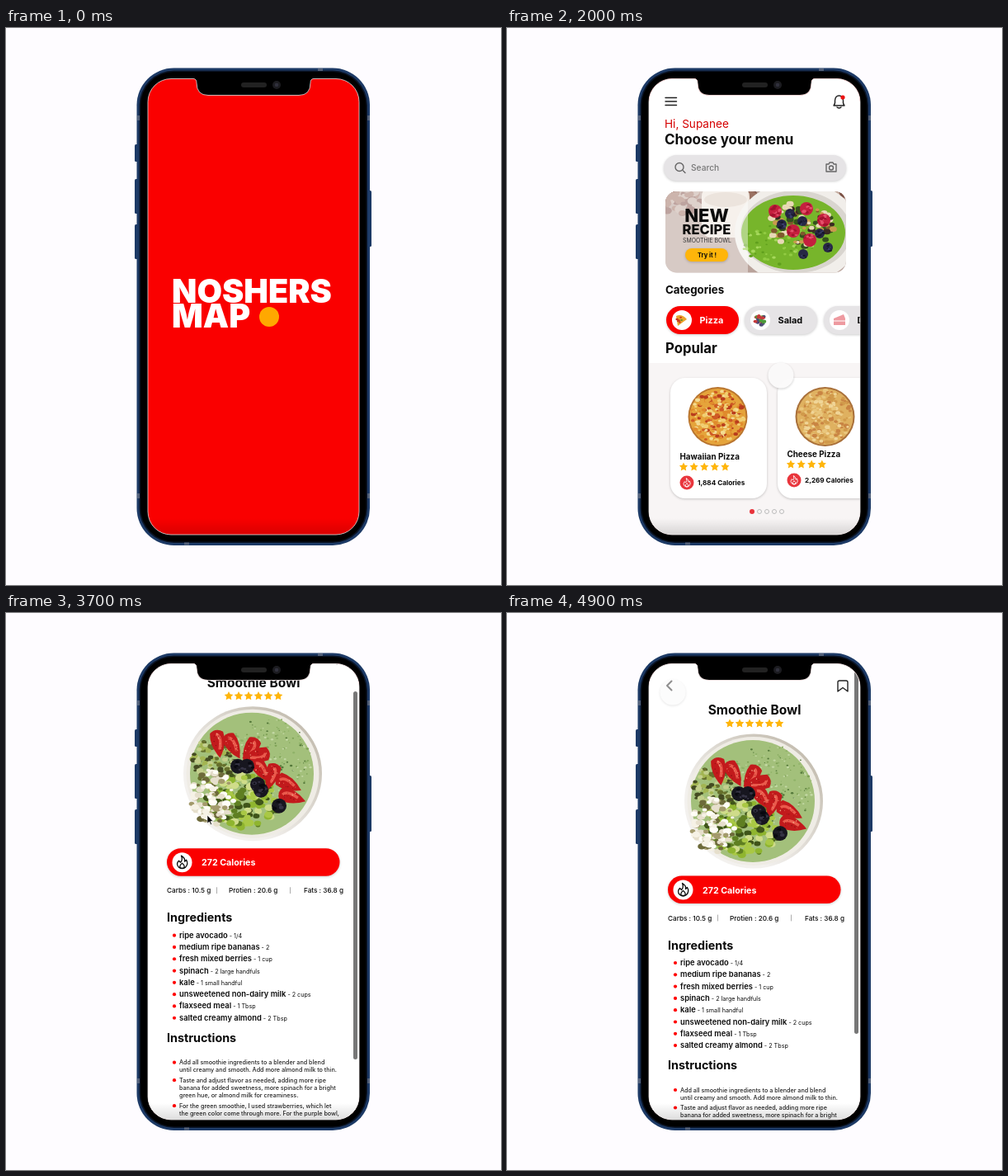
Animation of 600 by 675 pixels, one loop 5000 ms. Source, as an HTML page:

```html
<!DOCTYPE html>
<html lang="en">
<head>
<meta charset="utf-8">
<title>Recipe app</title>
<style>
html, body { margin: 0; width: 100%; height: 100%; overflow: hidden; background: #fefcff; }
svg { display: block; width: 100%; height: 100%; font-family: Inter, "Open Sans", sans-serif; }
.lift { filter: drop-shadow(0 1.5px 1.5px #0003); }
.line { fill: none; stroke: #222; stroke-width: 1.4; stroke-linecap: round; stroke-linejoin: round; }
</style>
</head>
<body>
<script>
const RED = '#fa0000', INK = '#0b0b0b', GOLD = '#ffb50a';
const SCREEN = 'M200 61.5H227q4 0 4 5q0 15 14 15H355q14 0 14-15q0-5 4-5H400a28 28 0 0 1 28 28V586a28 28 0 0 1-28 28H200a28 28 0 0 1-28-28V89.5a28 28 0 0 1 28-28Z';

let seed = 7;
const rnd = () => (seed = seed * 16807 % 2147483647) / 2147483647;

const text = (x, y, size, weight, str, fill = INK, anchor = 'start') =>
  `<text x="${x}" y="${y}" font-size="${size}" font-weight="${weight}" fill="${fill}" text-anchor="${anchor}">${str}</text>`;
const rect = (x, y, w, h, r, fill, more = '') =>
  `<rect x="${x}" y="${y}" width="${w}" height="${h}" rx="${r}" fill="${fill}" ${more}/>`;
const oval = (x, y, rx, ry, fill, more = '') =>
  `<ellipse cx="${x}" cy="${y}" rx="${rx}" ry="${ry}" fill="${fill}" ${more}/>`;
const disc = (x, y, r, fill, more) => oval(x, y, r, r, fill, more);
const line = (d, more = '') => `<path class="line" d="${d}" ${more}/>`;
const lift = 'class="lift"';

// Random specks spread over an ellipse
const specks = (n, x, y, rx, ry, size, colors) => Array.from({ length: n }, () => {
  const a = rnd() * 6.283, d = Math.sqrt(rnd()), s = size * (.5 + rnd() * .7);
  return oval((x + Math.cos(a) * d * rx).toFixed(1), (y + Math.sin(a) * d * ry).toFixed(1),
    s.toFixed(1), (s * .75).toFixed(1), colors[rnd() * colors.length | 0]);
}).join('');

const stars = (n, x, y, step, r) => Array.from({ length: n }, (_, i) => {
  const pts = Array.from({ length: 10 }, (_, k) => {
    const a = k * Math.PI / 5, d = k % 2 ? r * .5 : r;
    return (x + i * step + Math.sin(a) * d).toFixed(1) + ',' + (y - Math.cos(a) * d).toFixed(1);
  });
  return `<polygon points="${pts.join(' ')}" fill="${GOLD}"/>`;
}).join('');

const flame = (x, y, k, color) =>
  `<path transform="translate(${x} ${y}) scale(${k})" fill="none" stroke="${color}" stroke-width="1.3" stroke-linejoin="round"
    d="M-1-8Q4-5 3-1L5-3Q8 2 4 6Q0 9-4 6Q-8 2-4-2L-2 0Q1-3-1-8ZM0 1Q-4 4-2 7H2Q4 4 0 1Z"/>`;

const berry = (x, y, r, colors) => disc(x, y, r, colors[0]) + specks(12, x, y, r * .8, r * .8, r * .28, colors);

const logo = (x, y, k) => `<g transform="translate(${x} ${y}) scale(${k})">` +
  text(-2, 25.5, 39.5, 900, 'NOSHERS', '#fff') + text(-2, 55.5, 39.5, 900, 'MAP', '#fff') +
  disc(116, 43, 12, '#ffa800') + '</g>';

const splash = rect(170, 60, 260, 556, 0, RED) + logo(203, 307, 1);

const login = rect(170, 250, 260, 366, 0, '#e9e9e9') + rect(170, 60, 260, 152, 0, RED) + logo(230, 135, .72) +
  rect(170, 211, 260, 39, 0, '#fff', lift) +
  text(216, 236, 13.3, 700, 'Log in', '#e00000') + text(344, 236, 13.2, 400, 'Sign Up', '#444') +
  rect(206, 247, 54, 3.5, 0, RED) +
  rect(200, 274, 200, 38, 19, '#fff', lift) + text(212, 296, 9.3, 400, 'Enter Email or Username', '#888') +
  rect(200, 324, 200, 38, 19, '#fff', lift) + text(212, 346.5, 9.5, 400, 'Password', '#888') +
  text(393, 381, 8.3, 500, 'forgot password?', '#777', 'end') +
  rect(247, 406, 106, 32, 16, RED, lift) + text(298, 428, 14, 500, 'Log in', '#fff', 'middle') +
  line('M203 497H281M314 497H396', 'style="stroke:#888;stroke-width:1"') +
  text(298, 502, 13, 400, 'OR', '#666', 'middle') +
  ['#2458c5', '#4285f4', '#000'].map((c, i) => disc(250 + i * 44.5, 564, 16, '#fff') + disc(250 + i * 44.5, 564, 9, c)).join('');

const chip = (x, label, fill, color, icon) => rect(x, 337, 88, 34, 17, fill, lift) +
  disc(x + 19, 354, 12, '#fff') + `<g transform="translate(${x + 19} 354)">${icon}</g>` +
  text(x + 40.5, 358, 10.9, 700, label, color);

const card = (x, y, name, count, calories, crust, toppings) => rect(x, 424, 117, 146, 18, '#fff', lift) +
  disc(x + 57.5, 471, 36, crust) + disc(x + 57.5, 471, 34, toppings[0]) +
  specks(260, x + 57.5, 471, 32, 32, 2.7, toppings) +
  text(x + 11.5, y, 9.8, 700, name) + stars(count, x + 16, y + 9, 12.6, 5.4) +
  disc(x + 20, y + 28, 8.5, '#e9363d') + flame(x + 20, y + 28, .68, '#fff') +
  text(x + 33, y + 31, 8.2, 700, calories + ' Calories');

const banner = `<g clip-path="url(#banner)">` + rect(190, 196, 224, 102, 0, '#b9a39b') +
  specks(60, 205, 210, 30, 18, 6, ['#8d6159', '#a77d70', '#c6b0a5']) +
  specks(40, 345, 205, 75, 14, 6, ['#7b5146', '#9a7162', '#c5aca0']) +
  rect(236, 192, 58, 62, 12, '#efe6dd') + oval(265, 208, 26, 9, '#ded0c4') +
  oval(352, 248, 76, 62, '#f1eeea') + oval(350, 247, 67, 50, '#d9d5cf') + oval(347, 248, 63, 45, '#77b52b') +
  specks(70, 330, 262, 44, 26, 2.2, ['#5f9f1c', '#92cc43', '#a6d85c']) +
  specks(90, 358, 238, 42, 27, 4, ['#3b2a22', '#7f5a2d', '#c99a4e', '#35511d', '#e8d9b6']) +
  [[325, 222], [363, 219], [347, 246], [367, 257], [384, 233]].map(p => berry(...p, 8, ['#c51f3e', '#e4506b', '#a2122e'])).join('') +
  [[343, 225], [333, 238], [379, 249], [359, 274], [389, 266], [358, 234]].map(p => berry(...p, 6, ['#272745', '#3b3f6c', '#17172b'])).join('') +
  rect(190, 196, 102, 102, 0, '#fff', 'opacity=".42"') + '</g>' +
  text(242, 235, 22, 800, 'NEW', INK, 'middle') + text(242, 250, 16.5, 800, 'RECIPE', INK, 'middle') +
  text(242.5, 260, 6.9, 400, 'SMOOTHIE BOWL', '#333', 'middle') +
  rect(216, 267, 52, 16, 8, GOLD, lift) + text(242.5, 278, 7.4, 700, 'Try it !', INK, 'middle');

const home = rect(170, 60, 260, 556, 0, '#fff') + rect(170, 406, 260, 210, 0, '#f8f5f5') +
  line('M192 84.5H205.5M192 89H205.5M192 93.5H205.5') +
  line('M396 94Q398 92 397.5 88Q398 82 402.5 82Q407 82 407.5 88Q407 92 409 94ZM400 96Q402.5 98 405 96') +
  disc(407, 84, 2.6, '#e11') +
  text(191, 120.5, 13.6, 400, 'Hi, Supanee', '#d50000') + text(191, 141, 17, 700, 'Choose your menu') +
  rect(190, 154, 221, 31, 15.5, '#e6e4e6', lift) +
  `<g opacity=".65">${line('M213.5 173L216 175.5M214 168.5a5 5 0 1 1-10 0a5 5 0 1 1 10 0')}` +
  line('M387 165H390L391 163H395L396 165H399V174H387ZM395.5 169.5a2.5 2.5 0 1 1-5 0a2.5 2.5 0 1 1 5 0') + '</g>' +
  text(223, 173, 10.2, 500, 'Search', '#777') + banner +
  text(192, 322, 13.3, 700, 'Categories') +
  chip(193, 'Pizza', RED, '#fff', '<path d="M-7-5Q0-8 6-1L-5 7Z" fill="#eba52d"/>' + specks(6, -2, -1, 4, 4, 1.5, ['#c8321c', '#5b8a2a'])) +
  chip(288, 'Salad', '#e6e4e6', INK, specks(26, 0, 0, 7, 6, 2.4, ['#4c9a3a', '#83bd55', '#c63a3a', '#4b4a75'])) +
  chip(384, 'Dessert', '#e6e4e6', INK, '<path d="M-7-2L5-7L7-2V6H-7Z" fill="#ee9aa0"/><path d="M-7 1H7" stroke="#fff"/>') +
  text(192, 394, 16.7, 700, 'Popular') +
  card(198, 523, 'Hawaiian Pizza', 5, '1,884', '#b9752f', ['#e5a43b', '#f1cf72', '#cf5a25', '#e08a2c', '#b93d1d', '#f4dc93']) +
  card(328, 520, 'Cheese Pizza', 4, '2,269', '#a9703a', ['#dfb160', '#e9c67c', '#d19a4b', '#c98443', '#f0d597']) +
  disc(297, 586, 3, '#e8323a') + [306, 315, 324, 333].map(x => disc(x, 586, 2.5, 'none', 'stroke="#bbb"')).join('');

const strawberry = ([x, y, a]) => `<g transform="translate(${x} ${y}) rotate(${a})">` +
  '<path d="M-8-13Q0-19 8-13Q11 2 0 18Q-11 2-8-13Z" fill="#c21a1c"/><path d="M-1-11Q6-8 1 8" stroke="#ea5a4c" stroke-width="3.5" fill="none"/>' +
  specks(12, 0, -2, 6, 12, .8, ['#f0a080', '#8f0f12']) + '</g>';

const bowl = oval(299, 228, 84, 81.5, 'url(#rim)') + oval(299, 228, 80.5, 78, '#efece5') + oval(298, 228, 75, 74, '#a3c07b') +
  specks(260, 318, 212, 52, 54, 1.4, ['#7fa356', '#8fb268', '#c3d8a4', '#54783a']) +
  specks(120, 253, 215, 27, 33, 3.6, ['#66702c', '#a3b552', '#454c22', '#c3cf8c']) +
  specks(150, 287, 261, 44, 33, 5, ['#8fb52f', '#a9c845', '#5f7f22', '#cfdc8a', '#3f5419']) +
  specks(120, 250, 257, 26, 34, 4.5, ['#f6f2e6', '#e6dfcc', '#fffdf6', '#a39a6c', '#6d6a3a']) +
  [[257, 191, -8], [275, 194, -28], [296, 199, 28], [304, 206, 80], [322, 231, 18], [310, 224, -35], [342, 240, -62], [346, 256, -72]].map(strawberry).join('') +
  [[281, 219], [292, 219], [305, 241], [309, 248], [331, 267]].map(p => berry(...p, 9, ['#17161f', '#353344', '#090910'])).join('');

const foods = ['ripe avocado|1/4', 'medium ripe bananas|2', 'fresh mixed berries|1 cup', 'spinach|2 large handfuls',
  'kale|1 small handful', 'unsweetened non-dairy milk|2 cups', 'flaxseed meal|1 Tbsp', 'salted creamy almond|2 Tbsp'];
const steps = [
  [580.5, 'Add all smoothie ingredients to a blender and blend', 'until creamy and smooth. Add more almond milk to thin.'],
  [602, 'Taste and adjust flavor as needed, adding more ripe', 'banana for added sweetness, more spinach for a bright', 'green hue, or almond milk for creaminess.'],
  [633, 'For the green smoothie, I used strawberries, which let', 'the green color come through more. For the purple bowl,']];

const detail = rect(170, 61, 260, 700, 0, '#fff') +
  line('M199.5 82.5L194 88L199.5 93.5', 'style="stroke-width:2"') + line('M401 95V84Q401 82 403 82H411Q413 82 413 84V95L407 90.5Z') +
  text(300, 123, 15.5, 700, 'Smoothie Bowl', INK, 'middle') + stars(6, 270, 134, 12, 5.6) + bowl +
  rect(195, 318.5, 209.5, 33.5, 16.7, RED, lift) + disc(213.5, 335.5, 12, '#fff') + flame(213.5, 335.5, 1, INK) +
  text(237, 339.5, 10.7, 700, '272 Calories', '#fff') +
  text(195, 372.5, 8.2, 500, 'Carbs : 10.5 g') + text(270, 372.5, 8.2, 500, 'Protien : 20.6 g') + text(361, 372.5, 8.2, 500, 'Fats : 36.8 g') +
  line('M255.5 366V373M344.5 366V373', 'style="stroke:#999;stroke-width:.8"') +
  text(195, 407.5, 14.3, 700, 'Ingredients') + text(195, 553, 14.3, 700, 'Instructions') +
  foods.map((f, i) => {
    const [name, amount] = f.split('|'), y = 427 + i * 14.3;
    return disc(204, y - 3, 2.1, '#f00') +
      text(210, y, 9.4, 600, `${name}<tspan font-size="7.2" font-weight="400"> - ${amount}</tspan>`);
  }).join('') +
  steps.map(([y, ...rows]) => disc(204, y - 2.5, 2.1, '#f00') +
    rows.map((r, i) => text(210, y + i * 9.2, 7.2, 500, r, '#222')).join('')).join('');

const rim = '#1d3a66';
document.body.innerHTML = `<svg viewBox="0 0 600 675" preserveAspectRatio="none"><defs>
  <clipPath id="screen"><path d="${SCREEN}"/></clipPath>
  <clipPath id="banner">${rect(192, 198, 219, 98.5, 14, '#000')}</clipPath>
  <linearGradient id="rim" y1="1" y2="0"><stop offset=".3" stop-color="#f3f1ee"/><stop offset="1" stop-color="#b9b1a2"/></linearGradient>
  <linearGradient id="shade" x2="0" y2="1"><stop stop-opacity="0"/><stop offset="1" stop-opacity=".14"/></linearGradient></defs>` +
  [[141, 21], [183, 42], [238, 42]].map(([y, h]) => rect(156, y, 5, h, 1.5, rim)).join('') + rect(438, 197, 5, 68, 1.5, rim) +
  rect(158.5, 48.5, 282.5, 578.5, 45, rim) + rect(161.5, 51.5, 276.5, 572.5, 42, '#0a1426') + rect(163, 53, 273.5, 569.5, 41, '#000') +
  [[159, 106, 3, 6], [159, 564, 3, 6], [438, 106, 3, 6], [438, 564, 3, 6], [378, 49, 6, 3], [216, 623.5, 6, 3]].map(b => rect(...b, 0, '#53617a')).join('') +
  `<g clip-path="url(#screen)"><g id="splash">${splash}</g><g id="login">${login}</g><g id="home">${home}</g>
  <g id="detail">${rect(170, 60, 260, 20, 0, '#111')}<g id="page">${detail}</g></g>
  ${rect(170, 594, 260, 21, 0, 'url(#shade)')}
  ${rect(421, 64, 5, 446, 2.5, '#777', 'id="bar"')}</g>
  <path d="${SCREEN}" fill="none" stroke="#e6e2e2" stroke-width=".8"/>` +
  rect(285, 66, 31, 6, 3, '#222') + disc(328, 69, 5, '#1c1c20') + disc(328, 69, 2.3, '#30303c') +
  `<path id="arrow" d="M244 245V255L246.5 253L248 256.5L249.5 256L248 252.5H251Z" fill="#000" stroke="#fff" stroke-width=".6"/>` +
  disc(0, 0, 15.5, '#fbfafa', 'id="touch" class="lift"') + '</svg>';

const $ = id => document.getElementById(id);

// Eased value at time t from [time, value] pairs
function track(t, ...keys) {
  const i = keys.findIndex(k => k[0] > t);
  if (i === 0) return keys[0][1];
  if (i < 0) return keys[keys.length - 1][1];
  const [t0, a] = keys[i - 1], [t1, b] = keys[i], u = (t - t0) / (t1 - t0);
  return a + (b - a) * u * u * (3 - 2 * u);
}
const fade = (id, value) => $(id).setAttribute('opacity', value);

function draw(t) {
  fade('login', track(t, [400, 0], [950, 1]));
  fade('home', track(t, [1350, 0], [1750, 1]));
  fade('detail', track(t, [2500, 0], [2850, 1]));

  const scroll = track(t, [3300, 0], [3900, 45], [4250, 0], [4400, -5], [4600, 0]);
  $('page').setAttribute('transform', `translate(0 ${-scroll})`);
  $('bar').setAttribute('y', 64 + .93 * scroll);
  fade('bar', track(t, [3250, 0], [3400, 1]));
  fade('arrow', +(t >= 3150 && t < 4550));

  const x = track(t, [850, 377], [1250, 300], [1850, 300], [2000, 332], [2400, 246], [4550, 246], [4850, 201]);
  const y = track(t, [850, 137], [1250, 422], [2000, 421], [2400, 279], [3200, 279], [3300, 250], [4550, 250], [4850, 96]);
  $('touch').setAttribute('transform', `translate(${x} ${y})`);
  fade('touch', track(t, [500, 0], [800, .5], [1000, .95], [2700, .95], [3000, .6], [3150, 0], [4550, 0], [4700, .9], [4900, .5]));
}

let start;
function loop(now) {
  start ??= now;
  draw((now - start) % 5000);
  requestAnimationFrame(loop);
}
requestAnimationFrame(loop);
</script>
</body>
</html>
```
